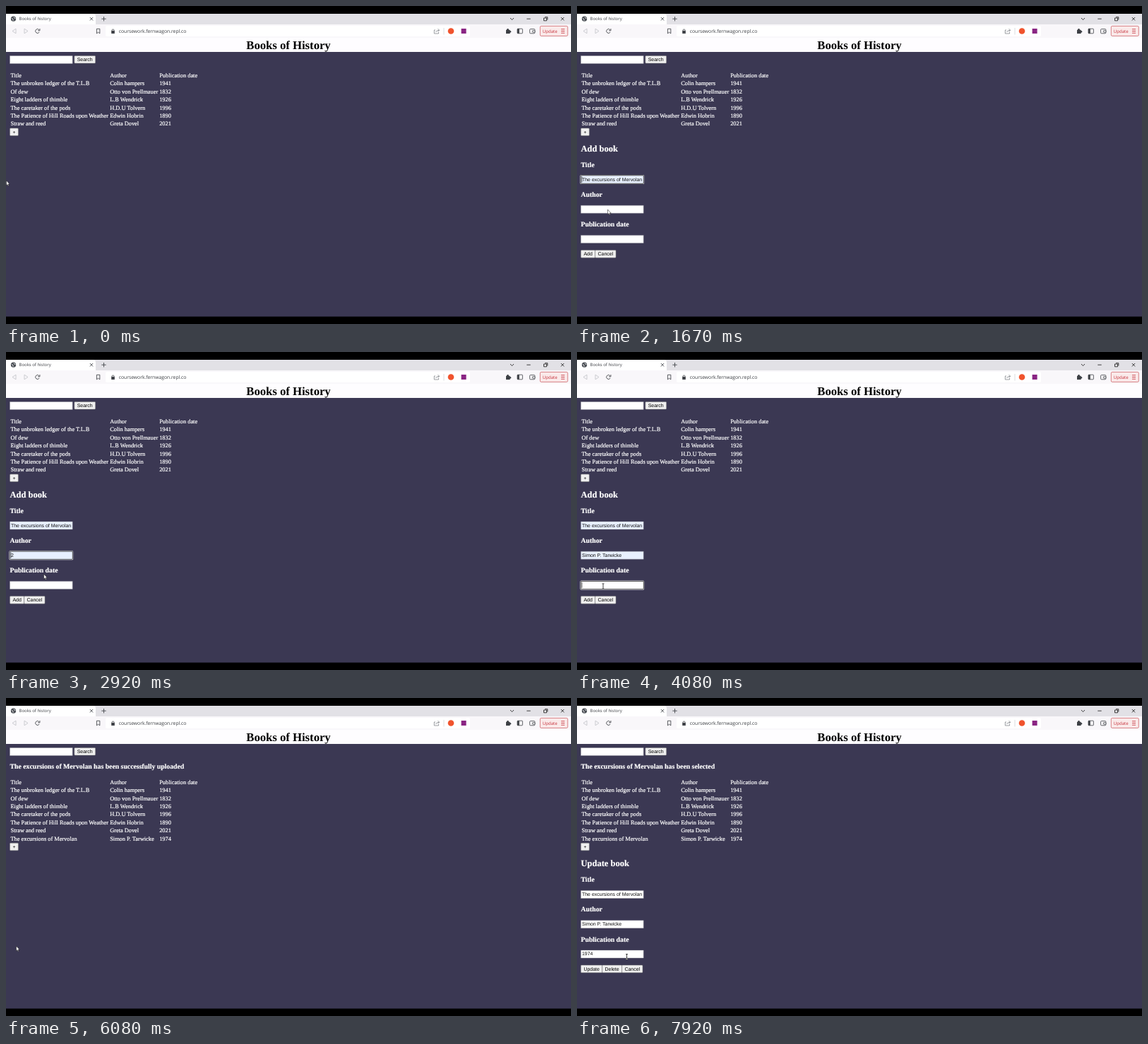
An HTML page with a canvas that plays this animation: 800 by 450 pixels, repeating every 8 s.

```html
<!DOCTYPE html>
<html lang="en">
<head>
<meta charset="utf-8">
<title>Books of history</title>
<style>
html, body { margin: 0; width: 100%; height: 100%; overflow: hidden; background: #000; }
canvas { display: block; width: 800px; height: 450px; }
</style>
</head>
<body>
<canvas id="stage" width="800" height="450"></canvas>
<script>
const ctx = document.getElementById('stage').getContext('2d');
ctx.textRendering = 'geometricPrecision';

const LOOP = 8000, STEP = 1000 / 12;
const SCALE = 1.25 * 800 / 1920; // page pixels to stage pixels
const LEFT = 5.5, ROW = 22 * SCALE, GROUP = 81 * SCALE, FIELD_W = 88.7, BOX_H = 11;
const serif = (px, weight = '') => `${weight} ${px * SCALE}px "Liberation Serif", "Times New Roman", serif`;
const BODY = serif(16), H1 = serif(32, 'bold'), H2 = serif(24, 'bold'), H3 = serif(18.72, 'bold');
const CONTROL = `${13.333 * SCALE}px "Liberation Sans", Arial, sans-serif`;
const ui = px => `${px}px "Open Sans", "Noto Sans", sans-serif`;
const INK = '#3c3f44', PALE = '#c3c5c9', RED = '#c5303a', AUTOFILL = '#e8f0fe';

const HEAD = ['Title', 'Author', 'Publication date'];
const NEW_BOOK = ['The excursions of Mervolan', 'Simon P. Tarwicke', '1974'];
const BOOKS = [
  ['The unbroken ledger of the T.L.B', 'Colin hampers', '1941'],
  ['Of dew', 'Otto von Prellmauer', '1832'],
  ['Eight ladders of thimble', 'L.B Wendrick', '1926'],
  ['The caretaker of the pods', 'H.D.U Tolvern', '1996'],
  ['The Patience of Hill Roads upon Weather', 'Edwin Hobrin', '1890'],
  ['Straw and reed', 'Greta Dovel', '2021']
];
const COLUMNS = [6.5, 147.2, 217.2];

const FORM_OPENS = 660, SAVED = 5990, SELECTED = 7410;
const FOCUS = [1080, 2490, 3990];
// values offered or picked from the autofill list
const FILLS = [
  { at: 1330, field: 0, value: NEW_BOOK[0] },
  { at: 2740, field: 1, value: '2' },
  { at: 3000, field: 1, value: NEW_BOOK[1] },
  { at: 4490, field: 2, value: '1926' },
  { at: 4910, field: 2, value: NEW_BOOK[2] },
  { at: 5240, field: 2, value: NEW_BOOK[2], picked: true }
];

// pointer moves: start, end, x, y
const MOVES = [
  [0, 500, 11, 178], [580, 1150, 44, 245], [1250, 1667, 43.5, 288], [1667, 1917, 51, 294],
  [2083, 2500, 55, 287], [2500, 3167, 53, 327], [3417, 4083, 37, 331.5], [4250, 4583, 42, 417],
  [4750, 5417, 12.5, 363], [5417, 5583, 14.5, 351], [6333, 6667, 100, 221], [6750, 7000, 100, 198],
  [7333, 7917, 70.5, 366]
];

function pointerAt(t) {
  let x = 0.5, y = 247;
  for (const [start, end, toX, toY] of MOVES) {
    const k = Math.min(1, Math.max(0, (t - start) / (end - start)));
    const ease = k * k * (3 - 2 * k);
    x += (toX - x) * ease;
    y += (toY - y) * ease;
  }
  return { x, y };
}

function rect(x, y, w, h, color) {
  ctx.fillStyle = color;
  ctx.fillRect(x, y, w, h);
}

function box(x, y, w, h, r, fill, stroke, width = 0.8) {
  ctx.beginPath();
  ctx.roundRect(x, y, w, h, r);
  if (fill) { ctx.fillStyle = fill; ctx.fill(); }
  if (stroke) { ctx.strokeStyle = stroke; ctx.lineWidth = width; ctx.stroke(); }
}

function dot(x, y, r, color) {
  box(x - r, y - r, 2 * r, 2 * r, r, color);
}

function text(str, x, y, font, color = '#fff', align = 'left') {
  ctx.font = font;
  ctx.fillStyle = ctx.strokeStyle = color;
  ctx.textAlign = align;
  ctx.fillText(str, x, y);
  if (color === '#fff') {
    ctx.lineWidth = 0.2;
    ctx.strokeText(str, x, y);
  }
}

function textWidth(str, font) {
  ctx.font = font;
  return ctx.measureText(str).width;
}

// SVG path data drawn around x, y
function glyph(x, y, data, stroke, fill, width = 0.85) {
  const path = new Path2D(data);
  ctx.save();
  ctx.translate(x, y);
  if (fill) { ctx.fillStyle = fill; ctx.fill(path); }
  if (stroke) { ctx.strokeStyle = stroke; ctx.lineWidth = width; ctx.stroke(path); }
  ctx.restore();
}

function drawTabs() {
  const y = 18.2, cross = 'M-2.2 -2.2L2.2 2.2M2.2 -2.2L-2.2 2.2';
  rect(0, 11, 800, 15, '#e2e1e6');
  box(-6, 11, 133, 20, 4, '#fff');
  dot(10.5, y, 3.6, '#4b4f55');
  glyph(10.5, y, 'M-2.5 -1L-.5 .5V2.5M.5 -2.5L1.5 -1H3', '#fff');
  text('Books of history', 18.5, 20.3, ui(6), INK);
  glyph(121, y, cross, INK);
  glyph(138.5, y, 'M-3.2 0H3.2M0 -3.2V3.2', INK);
  glyph(716.5, y, 'M-2.5 -1.2L0 1.4L2.5 -1.2', '#222');
  glyph(740, y, 'M-2.7 0H2.7', '#222');
  glyph(764, y, 'M-2.5 -1.2H1.5V2.6H-2.5ZM-1 -2.5H2.8V1.3', '#222');
  glyph(788, y, cross, '#222');
}

function drawToolbar() {
  const y = 35.5;
  rect(0, 26, 800, 20, '#f9f7fa');
  box(141, 28, 516, 15, 2, '#fff');
  glyph(11.5, y, 'M2.5 -3.3V3.3L-2.5 0Z', PALE);
  glyph(28.5, y, 'M-2.5 -3.3V3.3L2.5 0Z', PALE);
  glyph(44.6, y, 'M2.5 1.5A2.9 2.9 0 1 1 2.2 -1.9M3.3 -3.4V-.6H.5', INK);
  glyph(130.6, y, 'M-2.2 -3.2H2.2V3.4L0 1.7L-2.2 3.4Z', INK);
  glyph(151.5, y, 'M-1.5 0V-1A1.5 1.5 0 0 1 1.5 -1V0', INK);
  rect(149.2, y - 0.5, 4.6, 4, INK);
  text('coursework.fernwagon.repl.co', 159.8, 38.1, ui(6.75), INK);

  glyph(610, y, 'M-2 -1.5H-3.7V3.5H2.5V1.5M-1.5 1.5Q-1 -1 3.5 -1.2M1.5 -3.2L3.7 -1.2L1.5 .8', '#8a8d92');
  glyph(620, y, 'M0 -4.5V5', '#d4d6da');
  dot(630, y, 4.3, '#f0532d');
  rect(644.6, 32, 7, 7, '#8a2583');
  rect(708, 33.8, 5.6, 5.3, INK);
  dot(710.5, 33.5, 1.4, INK);
  dot(713.8, 36.3, 1.4, INK);
  box(724, 32.2, 7.4, 6.6, 0.8, null, INK);
  rect(724, 32.2, 2.8, 6.6, INK);
  box(741.6, 32.6, 7.2, 6.2, 1, null, INK);
  box(745.4, 34.7, 3.6, 2.4, 0.6, '#fff', INK);
  box(756.3, 28.4, 39, 14, 1.5, '#faeaea', '#d0686c');
  text('Update', 759.8, 37.6, ui(6.1), RED);
  for (const dy of [-2.7, 0, 2.7]) glyph(788.5, y + dy, 'M-2.5 0H2.5', RED);
}

// draws a button sized by its label and returns its right edge
function button(label, x, y) {
  const w = textWidth(label, CONTROL) + 15 * SCALE;
  box(x, y, w, BOX_H - 0.4, 1, '#efefef', '#767676', 0.5);
  text(label, x + w / 2, y + 7.6, CONTROL, '#000', 'center');
  return x + w;
}

function drawField(y, { value = '', fill = '#fff', focus, caret, picked } = {}) {
  if (focus) {
    box(LEFT - 1, y - 1, FIELD_W + 2, BOX_H + 2, 1.5, '#fff');
    box(LEFT - 0.4, y - 0.4, FIELD_W + 0.8, BOX_H + 0.8, 1, '#101010');
  }
  box(LEFT, y, FIELD_W, BOX_H, 0, fill, focus ? '#101010' : '#8f8d99', 0.4);
  ctx.save();
  ctx.beginPath();
  ctx.rect(LEFT, y, FIELD_W - 2, BOX_H);
  ctx.clip();
  text(value, 7, y + 7.5, CONTROL, '#111');
  ctx.restore();
  if (caret) rect(6.7 + (picked ? textWidth(value, CONTROL) : 0), y + 1.3, 0.6, 8.2, '#000');
}

function drawTable(top, rows, mouse) {
  rows.forEach((row, i) => {
    const y = top + i * ROW;
    const hover = i && mouse.x < 272 && mouse.y > y - 8 && mouse.y < y + 3.4;
    if (hover) rect(6, y - 8, 266, BOX_H, '#5a5773');
    row.forEach((cell, c) => text(cell, COLUMNS[c], y, BODY));
  });
}

const fieldTop = (dy, i) => 240 + dy + i * GROUP;

function drawForm({ dy, heading, fields, buttons }) {
  text(heading, LEFT, 205.7 + dy, H2);
  fields.forEach((field, i) => {
    const y = fieldTop(dy, i);
    text(HEAD[i], LEFT, y - 12.3, H3);
    drawField(y, field);
  });
  buttons.reduce((x, label) => button(label, x, 345.6 + dy), LEFT);
}

function addFields(t) {
  const fields = HEAD.map(() => ({}));
  const active = FOCUS.filter(at => at <= t).length - 1;
  let changed = FOCUS[active];
  for (const { at, field, value, picked } of FILLS) {
    if (at > t) break;
    fields[field] = { value, picked, fill: AUTOFILL };
    changed = Math.max(changed, at);
  }
  if (active >= 0) {
    fields[active].focus = true;
    fields[active].caret = (t - changed) % 1080 < 540;
  }
  return fields;
}

function formAt(t) {
  if (t >= SELECTED) return {
    dy: 32.5, heading: 'Update book', buttons: ['Update', 'Delete', 'Cancel'],
    fields: NEW_BOOK.map(value => ({ value }))
  };
  if (t >= FORM_OPENS && t < SAVED) return {
    dy: 0, heading: 'Add book', buttons: ['Add', 'Cancel'], fields: addFields(t)
  };
}

function drawPage(t, mouse, form) {
  rect(0, 45, 800, 20, '#fefdff');
  rect(0, 65, 800, 374.5, '#3b3853');
  text('Books of History', 400, 61.2, H1, '#000', 'center');
  drawField(70.5);
  button('Search', 96.8, 70.5);

  const saved = t >= SAVED;
  if (saved) {
    const state = t >= SELECTED ? 'selected' : 'successfully uploaded';
    text(`${NEW_BOOK[0]} has been ${state}`, LEFT, 100.1, H3);
  }
  const rows = saved ? [HEAD, ...BOOKS, NEW_BOOK] : [HEAD, ...BOOKS];
  const top = saved ? 121.6 : 100.7;
  drawTable(top, rows, mouse);
  button('+', LEFT, top + rows.length * ROW - 8);
  if (form) drawForm(form);
}

// the text beam shows over a field unless another field's list covers it
function overField(form, { x, y }) {
  if (!form || x < LEFT || x > LEFT + FIELD_W) return false;
  const listOpen = form.fields.some(f => f.focus);
  return form.fields.some((f, i) => {
    const top = fieldTop(form.dy, i);
    return y > top && y < top + BOX_H && (f.focus || !listOpen);
  });
}

function drawPointer({ x, y }, beam) {
  if (beam) {
    ctx.globalCompositeOperation = 'difference';
    glyph(x, y, 'M0 -3.5V3.5M-1.5 -3.6H1.5M-1.5 3.6H1.5', '#ddd');
    ctx.globalCompositeOperation = 'source-over';
  } else {
    glyph(x, y, 'M0 0V6.9L1.5 5.5L2.5 7.8L3.6 7.3L2.6 5.1H4.7Z', '#111', '#fff', 0.5);
  }
}

function draw(now) {
  const t = Math.floor((now % LOOP + 5) / STEP) * STEP % LOOP;
  const mouse = pointerAt(t), form = formAt(t);
  rect(0, 0, 800, 450, '#000');
  drawTabs();
  drawToolbar();
  drawPage(t, mouse, form);
  drawPointer(mouse, overField(form, mouse));
}

const begin = performance.now();
function tick() {
  draw(performance.now() - begin);
  requestAnimationFrame(tick);
}
tick();
</script>
</body>
</html>
```
